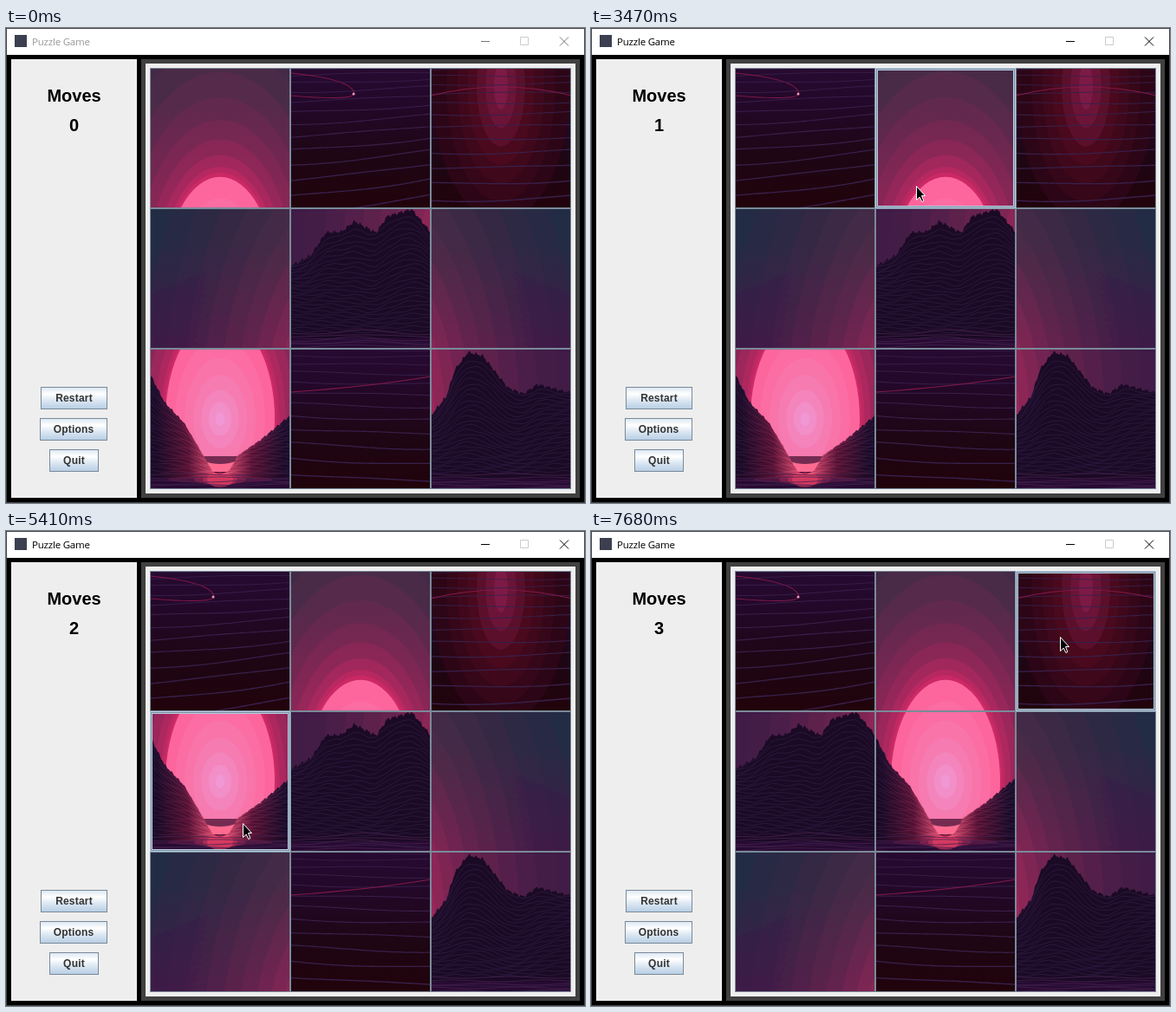
These frames come from a looping animation (668 by 548 pixels, 8 s). An HTML page with a canvas:

```html
<!DOCTYPE html>
<html lang="en">
<head>
<meta charset="utf-8">
<title>Puzzle Game</title>
<style>
  html, body { margin: 0; width: 668px; height: 548px; overflow: hidden; background: #000; }
  #win { position: relative; width: 668px; height: 548px; overflow: hidden; color: #000; }
  #win > * { position: absolute; box-sizing: border-box; }
  #edge { inset: 0; border: 1px solid #444; }
  #bar { left: 0; top: 0; width: 668px; height: 31px; background: #fff; }
  #bar span { position: absolute; left: 30px; top: 7px; font: 11.5px/17px "Open Sans", sans-serif; letter-spacing: -.2px; white-space: pre; }
  #bar svg { position: absolute; left: 0; top: 0; }
  .idle { color: #999; }
  .idle .ctl { stroke: #777; }
  .ctl { stroke: #000; }
  #side { left: 6px; top: 36px; width: 145px; height: 506px; background: #eee; }
  #frame { left: 156px; top: 36px; width: 506px; height: 506px; background: #eee; border: 5px solid #404040; }
  .big { left: 6px; width: 145px; text-align: center; font: bold 20px/24px "Liberation Sans", Arial, sans-serif; }
  .btn { height: 26px; border: 1px solid #7a8a99; text-align: center; color: #333;
    font: bold 12px/25px "Liberation Sans", Arial, sans-serif; letter-spacing: .2px;
    background: linear-gradient(#dde8f3, #fff 30%, #dde8f3 60%, #b8cfe5); }
  #board { left: 166px; top: 46px; }
</style>
</head>
<body>
<div id="win">
  <div id="bar" class="idle">
    <span>Puzzle Game</span>
    <svg width="668" height="31" fill="none">
      <rect x="10" y="8" width="14" height="14" fill="#3b3f50"/>
      <path class="ctl" d="M548 15.5h10M639 10.5l10 10M649 10.5l-10 10"/>
      <path stroke="#ccc" d="M593.5 10.5h9v9h-9z"/>
    </svg>
  </div>
  <div id="edge"></div>
  <div id="side"></div>
  <div id="frame"></div>
  <div class="big" style="top:66px">Moves</div>
  <div class="big" style="top:100px" id="count">0</div>
  <div class="btn" style="left:40px;top:414px;width:77px">Restart</div>
  <div class="btn" style="left:39px;top:450px;width:78px">Options</div>
  <div class="btn" style="left:50px;top:486px;width:57px">Quit</div>
  <canvas id="board" width="486" height="486"></canvas>
</div>
<script>
const SIZE = 486, TILE = 162, MID = 243, SHORE = 308, LOOP = 8000;
const art = document.createElement('canvas');
art.width = art.height = SIZE;
const a = art.getContext('2d');

const rgb = hex => [1, 3, 5].map(i => parseInt(hex.slice(i, i + 2), 16));

// colour at u (0..1) along evenly spaced stops
function ramp(stops, u) {
  const pos = u * (stops.length - 1), i = Math.min(stops.length - 2, Math.floor(pos));
  const from = rgb(stops[i]), to = rgb(stops[i + 1]);
  return `rgb(${from.map((c, j) => Math.round(c + (to[j] - c) * (pos - i)))})`;
}

function blend(x0, y0, x1, y1, stops) {
  const g = a.createLinearGradient(x0, y0, x1, y1);
  stops.forEach((c, i) => g.addColorStop(i / (stops.length - 1), c));
  return g;
}

function ellipse(x, y, rx, ry, fill, end = 7) {
  a.fillStyle = fill;
  a.beginPath();
  a.ellipse(x, y, rx, ry, 0, 0, end);
  a.fill();
}

function trace(f, x0 = 0, x1 = SIZE, step = 3) {
  a.beginPath();
  for (let x = x0; x <= x1; x += step) a.lineTo(x, f(x));
}

function sky() {
  const top = ['#c22661', '#722751', '#4a2b47', '#302845', '#1e2d45'];
  const low = ['#cf2a67', '#922759', '#66224e', '#461d48', '#3a1a44'];
  for (let i = 14; i >= 0; i--) {
    const u = i / 14, r = 65 + 240 * u ** 1.6;
    ellipse(MID, MID, r, r * 1.88, blend(0, 40, 0, 170, [ramp(top, u), ramp(low, u)]));
  }
  // ragged clouds, mirrored
  for (const side of [-1, 1]) {
    a.fillStyle = 'rgba(58,20,72,.22)';
    a.beginPath();
    a.moveTo(MID + side * 250, 102);
    for (let y = 72; y < 166; y += 3)
      a.lineTo(MID + side * (175 + y * y / 1500 + 5 * Math.sin(y * 1.3) * Math.sin(y / 9)), y);
    a.lineTo(MID + side * 250, 166);
    a.fill();
  }
}

function sun() {
  for (let i = 0; i < 7; i++) {
    const r = 63 * (1 - i / 7) ** 1.25;
    ellipse(MID, MID, r, r * (1.86 - i * .08), ramp(['#fd669c', '#f67bb0', '#f097d4'], i / 6));
  }
  a.fillStyle = '#ff6b90';
  a.fillRect(218, 286, 50, 24);
  ellipse(MID, 286, 24, 9, '#752b51', Math.PI);
}

function water() {
  a.fillStyle = blend(0, 304, 0, SIZE, ['#280b34', '#24082a', '#1e0614', '#21030b']);
  a.fillRect(0, 304, SIZE, SIZE);
  a.save();
  a.beginPath();
  a.rect(0, 324, SIZE, TILE);
  a.clip();
  for (let i = 0; i < 7; i++) {
    const u = i / 6;
    ellipse(MID, 345, 80 - 72 * u ** .8, 155 - 128 * u, ramp(['#2c0616', '#4a091d', '#7c1a45'], u));
  }
  a.restore();
  for (let i = 0, y = 312; y < 520; i++, y += 5 + i * 1.1) {
    const depth = Math.min(1, (y - 300) / 180);
    const bend = x => (x - 200) ** 2 * (x < 200 ? 2.2e-4 : 3.2e-4) * depth;
    a.strokeStyle = '#38204b';
    a.lineWidth = .7 + depth * .7;
    trace(x => y - bend(x) + 1.2 * Math.sin(x / 37 + i * 2.1));
    a.stroke();
  }
  a.strokeStyle = '#82194a';
  a.lineWidth = 1.1;
  a.stroke(new Path2D('M0 374Q90 368 162 356Q242 336 325 356Q394 362 398 354Q396 337 325 330'));
  ellipse(397, 354, 1.5, 1.5, '#e59ab8');
}

// key points of the ridge, valley in the middle
const ridgePoints = [
  [0, 229], [24, 216], [41, 190], [59, 189], [74, 177], [99, 190], [112, 171], [140, 163],
  [160, 187], [179, 224], [201, 247], [224, 286], [234, 303], [MID, SHORE], [254, 302], [264, 285],
  [289, 268], [325, 238], [342, 217], [352, 186], [367, 166], [384, 170], [413, 207], [431, 214],
  [447, 203], [SIZE, 213]];

function ridge(x) {
  const i = Math.max(1, ridgePoints.findIndex(p => p[0] >= x));
  const [x0, y0] = ridgePoints[i - 1], [x1, y1] = ridgePoints[i];
  return y0 + (y1 - y0) * (Math.max(0, Math.min(SIZE, x)) - x0) / (x1 - x0);
}

function mountains() {
  const rough = x => Math.min(1, Math.abs(x - MID) / 90) * (Math.sin(x * 1.7) + 1.2 * Math.sin(x * .83));
  const soft = x => {
    const near = d => ridge(Math.max(0, Math.min(SIZE, x + d)));
    return (near(-10) + near(0) * 2 + near(10)) / 4;
  };
  const tint = (edge, side, core) => blend(MID - 110, 0, MID + 110, 0,
    [edge, edge, side, core, side, edge, edge]);
  a.save();
  trace(x => ridge(x) + rough(x), 0, SIZE, 1);
  a.lineTo(SIZE, SHORE + 4);
  a.lineTo(0, SHORE + 4);
  a.clip();
  a.fillStyle = tint('#1b0a25', '#511233', '#f24a74');
  a.fillRect(0, 0, SIZE, SIZE);
  a.strokeStyle = tint('#2f1c46', '#7a1f48', '#ff7896');
  a.lineWidth = .7;
  for (let i = 1; i < 26; i++) {
    const u = i / 26;
    trace(x => {
      const top = soft(x), across = Math.abs(x - MID) - 151;
      return top + (SHORE - top) * u + 14 * Math.sin(Math.PI * u) * Math.cos(across / 40)
        + Math.sin(x / 5 + i * 1.9);
    });
    a.stroke();
  }
  a.restore();
}

function shore() {
  for (let i = 0; i < 4; i++)
    ellipse(MID, 313, 60 / (i + 1), 4 + i * 1.6, `rgba(${120 + i * 45},${30 + i * 13},${76 + i * 10},.5)`);
  a.strokeStyle = '#47234f';
  a.lineWidth = .8;
  for (let y = 307; y < 324; y += 4) {
    trace(x => y + Math.sin(x / 17 + y) - 4 * Math.exp(-(((x - 82) / 40) ** 2)));
    a.stroke();
  }
}

const ctx = document.getElementById('board').getContext('2d');
const bar = document.getElementById('bar');
const count = document.getElementById('count');

const start = [1, 8, 7, 0, 3, 2, 4, 6, 5];
const STEP = 46;
// pointer moves; press and release follow where there is a click
const moves = [
  { at: 730, steps: 4, x: 262, y: 330 },
  { at: 1140, steps: 8, x: 271, y: 178, press: 1750, release: 1930 },
  { at: 2160, steps: 6, x: 377, y: 177, press: 2640, release: 2870 },
  { at: 3470, steps: 12, x: 258, y: 425, press: 4210, release: 4390 },
  { at: 4540, steps: 4, x: 281, y: 347, press: 4900, release: 5080 },
  { at: 5360, steps: 5, x: 257, y: 320, press: 5790, release: 5970 },
  { at: 6150, steps: 6, x: 395, y: 304, press: 6610, release: 6840 },
  { at: 7400, steps: 7, x: 541, y: 122 }];
const clicks = moves.filter(m => m.press);

const cellAt = p => Math.floor((p.y - 46) / TILE) * 3 + Math.floor((p.x - 166) / TILE);

function pointer(t) {
  if (t < moves[0].at) return null;
  let x = 292, y = 500;
  for (const m of moves) {
    if (t < m.at) break;
    const u = Math.min(1, (Math.floor((t - m.at) / STEP) + 1) / m.steps);
    const p = u * u * (3 - 2 * u);
    x += (m.x - x) * p;
    y += (m.y - y) * p;
  }
  return { x: Math.round(x), y: Math.round(y) };
}

// every second click swaps its tile with the one picked before
function play(t) {
  const cells = [...start];
  let picked = null, count = 0;
  for (const c of clicks.filter(c => t >= c.release)) {
    const cell = cellAt(c);
    if (picked === null) { picked = cell; continue; }
    [cells[picked], cells[cell]] = [cells[cell], cells[picked]];
    picked = null;
    count++;
  }
  return { cells, count };
}

function ring(x, y, inset, color) {
  ctx.strokeStyle = color;
  ctx.lineWidth = 1;
  ctx.strokeRect(x + inset + .5, y + inset + .5, TILE - 1 - 2 * inset, TILE - 1 - 2 * inset);
}

function drawTile(cell, piece, hover, down) {
  const x = cell % 3 * TILE, y = Math.floor(cell / 3) * TILE;
  ctx.drawImage(art, piece % 3 * TILE, Math.floor(piece / 3) * TILE, TILE, TILE, x, y, TILE, TILE);
  if (hover && !down) {
    ['#b8cfe5', '#7a8a99', '#b8cfe5'].forEach((c, i) => ring(x, y, i, c));
    return;
  }
  ring(x, y, 0, '#7a8a99');
  if (hover) {
    ctx.fillStyle = '#7a8a99';
    ctx.fillRect(x, y, TILE, 2);
    ctx.fillRect(x, y, 2, TILE);
  }
}

const arrow = new Path2D('M.5 .5V16.5L4.2 13L6.8 18.5L8.8 17.5L6.5 11.5H10.5Z');

function drawPointer(p, down) {
  ctx.save();
  ctx.translate(p.x - 166, p.y - 46);
  if (down) {
    ctx.fillStyle = 'rgba(255,235,0,.5)';
    ctx.beginPath();
    ctx.arc(0, 0, 12, 0, 7);
    ctx.fill();
  }
  ctx.fillStyle = '#000';
  ctx.strokeStyle = '#fff';
  ctx.lineWidth = 1;
  ctx.fill(arrow);
  ctx.stroke(arrow);
  ctx.restore();
}

function draw() {
  const t = performance.now() % LOOP;
  const game = play(t), p = pointer(t);
  const down = clicks.some(c => t >= c.press && t < c.release);
  const over = p ? cellAt(p) : -1;
  game.cells.forEach((piece, i) => drawTile(i, piece, i === over, down));
  if (p) drawPointer(p, down);
  count.textContent = game.count;
  bar.className = t < clicks[0].press ? 'idle' : '';
  requestAnimationFrame(draw);
}

sky();
sun();
water();
mountains();
shore();
draw();
</script>
</body>
</html>
```
